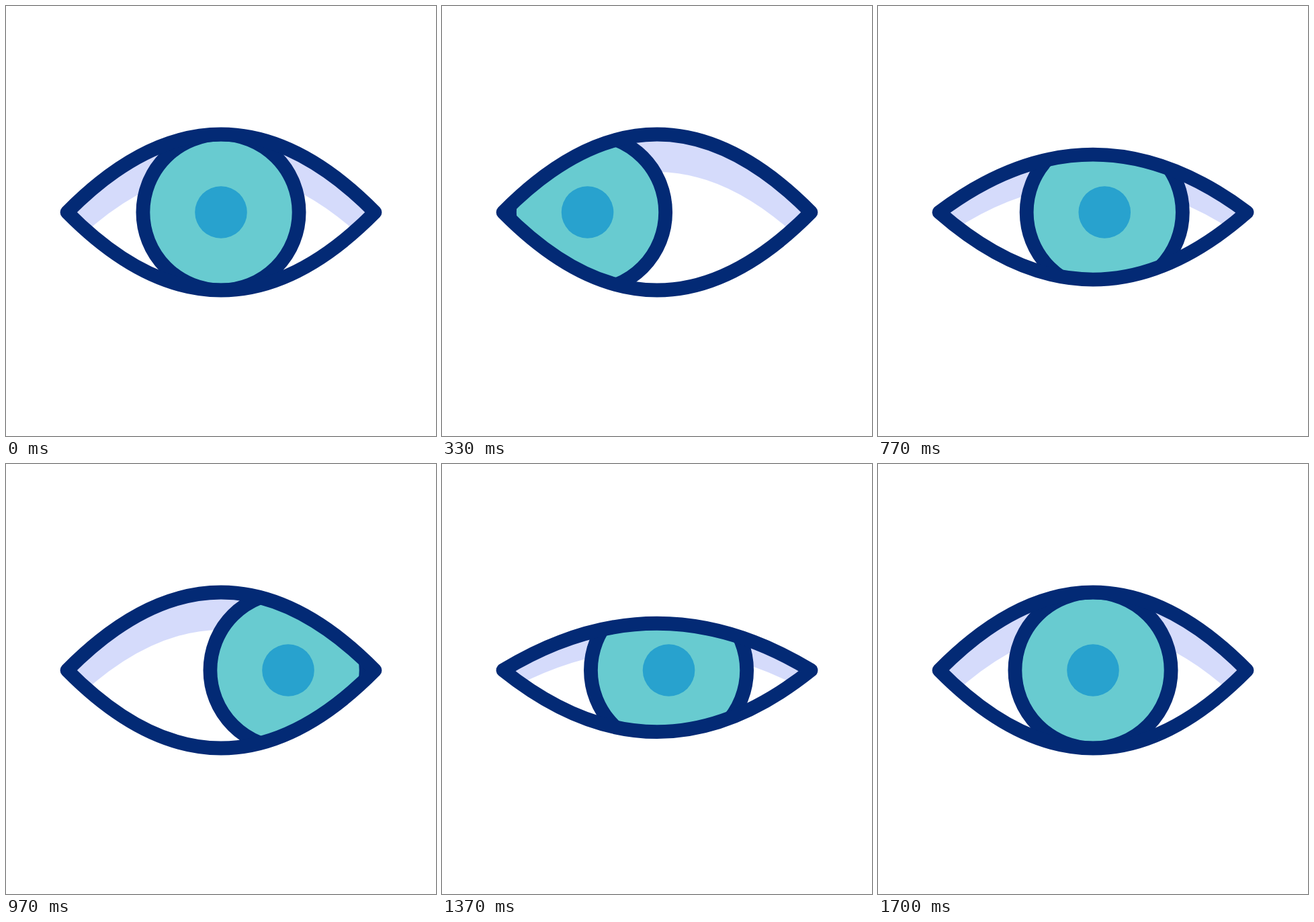
Animation of 640 by 640 pixels, one loop 2 s. Source, as an HTML page:

```html
<!DOCTYPE html>
<html lang="en">
<head>
<meta charset="utf-8">
<title>Looking eye</title>
<style>
html, body { margin: 0; width: 100%; height: 100%; overflow: hidden; background: #fff; }
svg { display: block; width: 100%; height: 100%; }
.line { stroke: #032a75; stroke-width: 20.8; stroke-linejoin: round; }
</style>
</head>
<body>
<svg viewBox="0 0 640 640">
  <clipPath id="opening"><path class="eye"/></clipPath>
  <g clip-path="url(#opening)">
    <rect width="640" height="640" fill="#d5dbfb"/>
    <path id="white" fill="#fff"/>
    <g id="iris">
      <circle class="line" cx="320" cy="307" r="116.1" fill="#68cbd0"/>
      <circle cx="320" cy="307" r="38.8" fill="#28a2ce"/>
    </g>
  </g>
  <path class="eye line" fill="none"/>
</svg>
<script>
const LEFT = 91, RIGHT = 549, MID = 307;
const LOOP = 2000;

// [frame, value] keys at 30 frames per second
const gaze = [[0, 0], [13.1, -120.5], [15, -120.5], [28.7, 100], [30, 100], [45, 0]];
const blink = [[13, 0], [19, 1], [24.6, 0], [38.8, 0], [44.8, 1], [50.8, 0]];

const eyes = document.querySelectorAll('.eye');
const white = document.getElementById('white');
const iris = document.getElementById('iris');

function valueAt(keys, frame) {
  const next = keys.findIndex(key => key[0] > frame);
  if (next === 0) return keys[0][1];
  if (next < 0) return keys[keys.length - 1][1];
  const [f0, v0] = keys[next - 1], [f1, v1] = keys[next];
  const u = (frame - f0) / (f1 - f0);
  return v0 + (v1 - v0) * u * u * (3 - 2 * u);
}

// Parabola through (x, side) with its apex at the given height
const arc = (x, side, apex) => `Q320 ${2 * apex - side} ${x} ${side}`;

function draw(frame) {
  const shut = valueAt(blink, frame);
  const top = 191 + 152 * shut;
  const bottom = 423 - 80 * shut;
  const outline = `M${LEFT} ${MID}${arc(RIGHT, MID, top)}${arc(LEFT, MID, bottom)}Z`;
  eyes.forEach(eye => eye.setAttribute('d', outline));

  const shadeSide = MID + 56 * Math.max(0, 1 - 1.3 * shut);
  const shadeApex = top + 56 * (1 - shut);
  white.setAttribute('d', `M${LEFT} ${shadeSide}${arc(RIGHT, shadeSide, shadeApex)}V640H${LEFT}Z`);

  iris.setAttribute('transform', `translate(${valueAt(gaze, frame)} 0)`);
}

function tick() {
  const time = performance.now() % LOOP;
  // Frames change on whole hundredths of a second
  draw(Math.floor((Math.floor(time / 10) + 0.5) * 0.3));
  requestAnimationFrame(tick);
}
tick();
</script>
</body>
</html>
```
